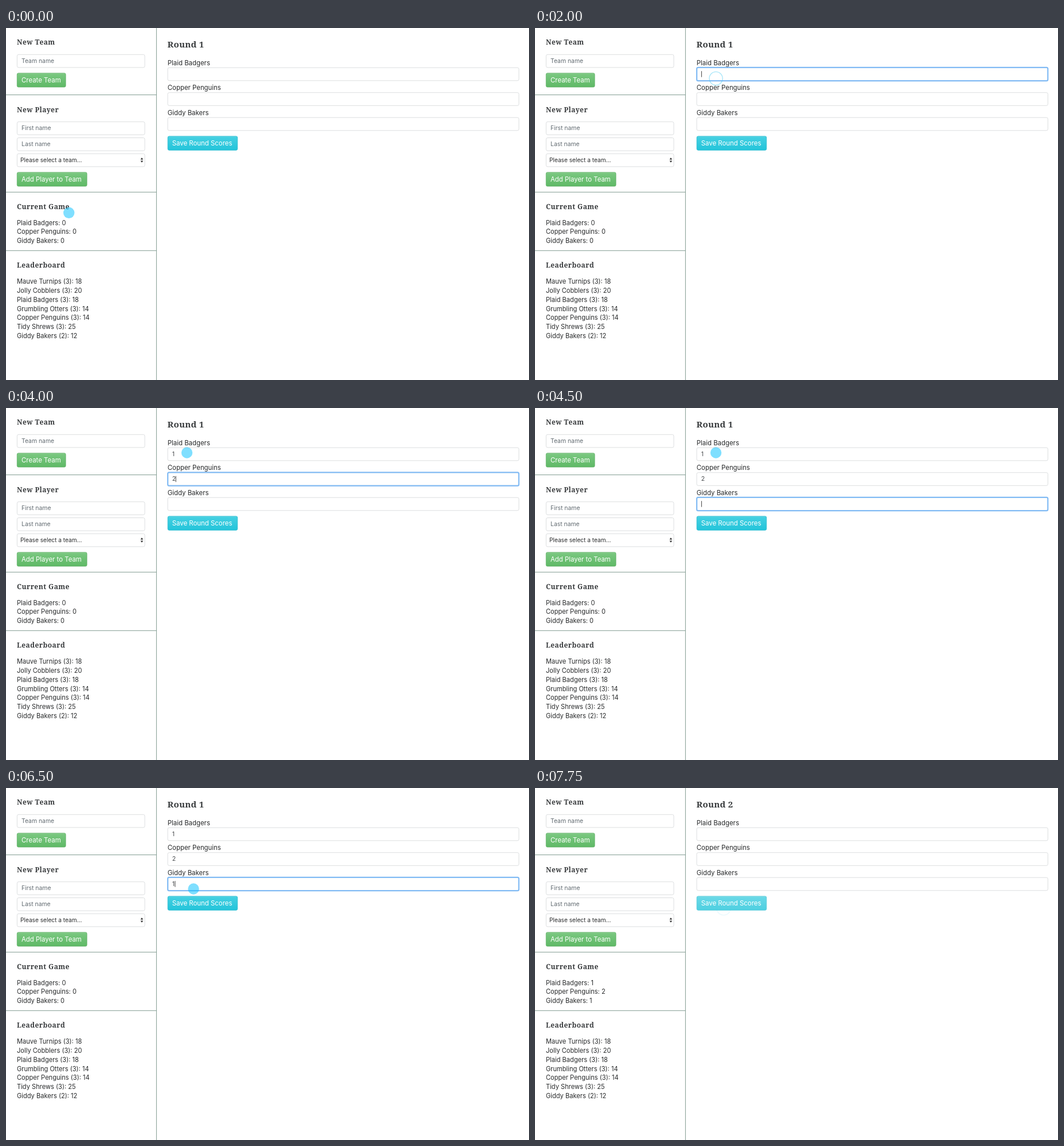
These frames come from a looping animation (912x614 px, 8 s). An HTML page:

```html
<!DOCTYPE html>
<html lang="en">
<head>
<meta charset="utf-8">
<title>Team scores</title>
<style>
  html, body { margin: 0; width: 100%; height: 100%; overflow: hidden; background: #fff; }
  svg { display: block; }
  text { font: 11.4px Inter, "Open Sans", sans-serif; fill: #292b2c; white-space: pre; }
  text.head { font: 800 12px "Noto Serif", serif; letter-spacing: .45px; fill: #373a3c; }
  text.title { font-size: 15px; letter-spacing: .3px; }
  text.side { font-size: 11.1px; }
  text.field { font-size: 10.4px; fill: #464a4c; }
  text.hint { fill: #636c72; }
  text.choice { font-size: 10.15px; fill: #292b2c; }
  text.button { fill: #fff; }
  .box { fill: #fff; stroke: #d4d6d8; stroke-width: .8; }
  .rule { stroke: #819b91; stroke-width: 1; }
  .focus { fill: none; stroke: #82bbf4; stroke-width: 2.2; }
  .caret { stroke: #333; stroke-width: .9; }
</style>
</head>
<body>
<svg id="stage" width="912" height="614" viewBox="0 0 912 614">
  <defs>
    <linearGradient id="green" x2="0" y2="1">
      <stop offset="0" stop-color="#7bc881"/><stop offset="1" stop-color="#5fb966"/>
    </linearGradient>
    <linearGradient id="cyan" x2="0" y2="1">
      <stop offset="0" stop-color="#46d0e2"/><stop offset="1" stop-color="#23c4da"/>
    </linearGradient>
  </defs>
</svg>
<script>
const LOOP = 8000, STEP = 250;
const stage = document.getElementById("stage");

function add(tag, attrs, content) {
  const node = document.createElementNS("http://www.w3.org/2000/svg", tag);
  set(node, attrs);
  if (content !== undefined) node.textContent = content;
  return stage.appendChild(node);
}
function set(node, attrs) {
  for (const key in attrs) node.setAttribute(key, attrs[key]);
}
const show = (node, on) => set(node, { visibility: on ? "visible" : "hidden" });
const label = (x, y, content, kind = "") => add("text", { x, y, class: kind }, content);
const rule = (x1, y1, x2, y2) => add("line", { x1, y1, x2, y2, class: "rule" });
const box = (x, y, width) => add("rect", { x, y, width, height: 22.6, rx: 2.6, class: "box" });

function button(y, x, width, content, paint, edge) {
  const face = add("rect", {
    x: x + .3, y: y + .4, width: width - .6, height: 24.4, rx: 2.4,
    fill: `url(#${paint})`, stroke: edge, "stroke-width": .7
  });
  add("line", { x1: x + 2, x2: x + width - 2, y1: y + 1.2, y2: y + 1.2,
    stroke: "#fff", "stroke-opacity": .18, "stroke-width": .8 });
  label(x + 8, y + 16.2, content, "button");
  return face;
}

// Sidebar
const teams = ["Plaid Badgers", "Copper Penguins", "Giddy Bakers"];

label(19, 28.5, "New Team", "head");
box(19.4, 46.3, 222.6);
label(27, 60.8, "Team name", "field hint");
button(78.3, 19, 85.4, "Create Team", "green", "#52a85a");

label(19, 146.5, "New Player", "head");
["First name", "Last name"].forEach((hint, i) => {
  box(19.4, 163.6 + i * 27.9, 222.6);
  label(27, 178.1 + i * 27.9, hint, "field hint");
});
box(19.4, 219.3, 222.6);
label(25, 233.8, "Please select a team...", "field choice");
add("path", { d: "M234.6 229.4h4.6l-2.3-3.4zM234.6 231.4h4.6l-2.3 3.4z", fill: "#333" });
button(251.3, 19, 122.4, "Add Player to Team", "green", "#52a85a");

label(19, 315.5, "Current Game", "head");
const totals = teams.map((_, i) => label(19, 343.7 + i * 15.7, "", "side"));

label(19, 418, "Leaderboard", "head");
[
  "Mauve Turnips (3): 18", "Jolly Cobblers (3): 20", `${teams[0]} (3): 18`,
  "Grumbling Otters (3): 14", `${teams[1]} (3): 14`, "Tidy Shrews (3): 25",
  `${teams[2]} (2): 12`
].forEach((row, i) => label(19, 446.4 + i * 15.72, row, "side"));

[116.6, 286.3, 388.3].forEach(y => rule(0, y, 262, y));
rule(262.4, 0, 262.4, 614);

// Round form
const title = label(281.5, 34, "", "head title");
const entries = [
  { score: 1, focusAt: 2000, typeAt: 2500, blurAt: 3500 },
  { score: 2, focusAt: 3500, typeAt: 4000, blurAt: 4500 },
  { score: 1, focusAt: 4500, typeAt: 5250, blurAt: 7250 }
];
entries.forEach((entry, i) => {
  const y = 69.2 + i * 43.5;
  label(281.8, y - 4.3, teams[i]);
  box(282, y, 612.4);
  entry.value = label(289.7, y + 14.5, entry.score, "field");
  entry.ring = add("rect", { x: 282.1, y: y - .4, width: 612.2, height: 23.4, rx: 2.4, class: "focus" });
  entry.caret = add("line", { y1: y + 6, y2: y + 16.4, class: "caret" });
});
const SAVE_TOP = 188.4;
const save = button(SAVE_TOP, 281.8, 122.2, "Save Round Scores", "cyan", "#1fb5ca");

// Pointer
const disc = add("circle", { r: 9.7, fill: "#00bfff", "fill-opacity": .5 });
const ripple = add("circle", { fill: "none", stroke: "#4fcdf3", "stroke-width": 1.4 });
const path = [
  [0, 109.7, 322.3], [250, 117, 313], [500, 161, 264], [750, 219, 198],
  [1000, 267, 145], [1250, 299, 104], [1500, 313, 83], [1750, 315.5, 78],
  [6000, 316.5, 86], [6250, 321, 122], [6500, 327, 176], [6750, 329, 206], [7000, 329, 199]
];
const clicks = [2000, 7250], SAVED = 7500;

function draw(now) {
  const t = Math.floor(now % LOOP / STEP) * STEP;
  const saved = t >= SAVED;

  title.textContent = saved ? "Round 2" : "Round 1";
  totals.forEach((node, i) => {
    node.textContent = `${teams[i]}: ${saved ? entries[i].score : 0}`;
  });

  for (const { score, focusAt, typeAt, blurAt, value, ring, caret } of entries) {
    const focused = t >= focusAt && t < blurAt;
    const typed = t >= typeAt;
    const sinceKey = t - (typed ? typeAt : focusAt);
    const x = typed ? (score === 1 ? 294.9 : 296.2) : 290.5;
    show(value, typed && !saved);
    show(ring, focused);
    show(caret, focused && sinceKey % 1000 < 500);
    set(caret, { x1: x, x2: x });
  }

  const [, cx, cy] = path.findLast(([at]) => at <= t);
  const click = clicks.find(at => t >= at && t < at + 750);
  const phase = (t - click) / STEP;
  set(disc, { cx, cy });
  show(disc, click === undefined);
  show(ripple, click !== undefined);
  if (click !== undefined) {
    set(ripple, { cx, cy: cy + 10, r: 11.6 + phase * .5, "stroke-opacity": .5 * .5 ** phase });
  }
  const hovered = cx > 282 && cx < 404 && cy > SAVE_TOP && cy < SAVE_TOP + 25;
  set(save, { opacity: hovered ? .8 : 1 });
}

const start = performance.now();
function tick() {
  draw(performance.now() - start);
  requestAnimationFrame(tick);
}
tick();
</script>
</body>
</html>
```
